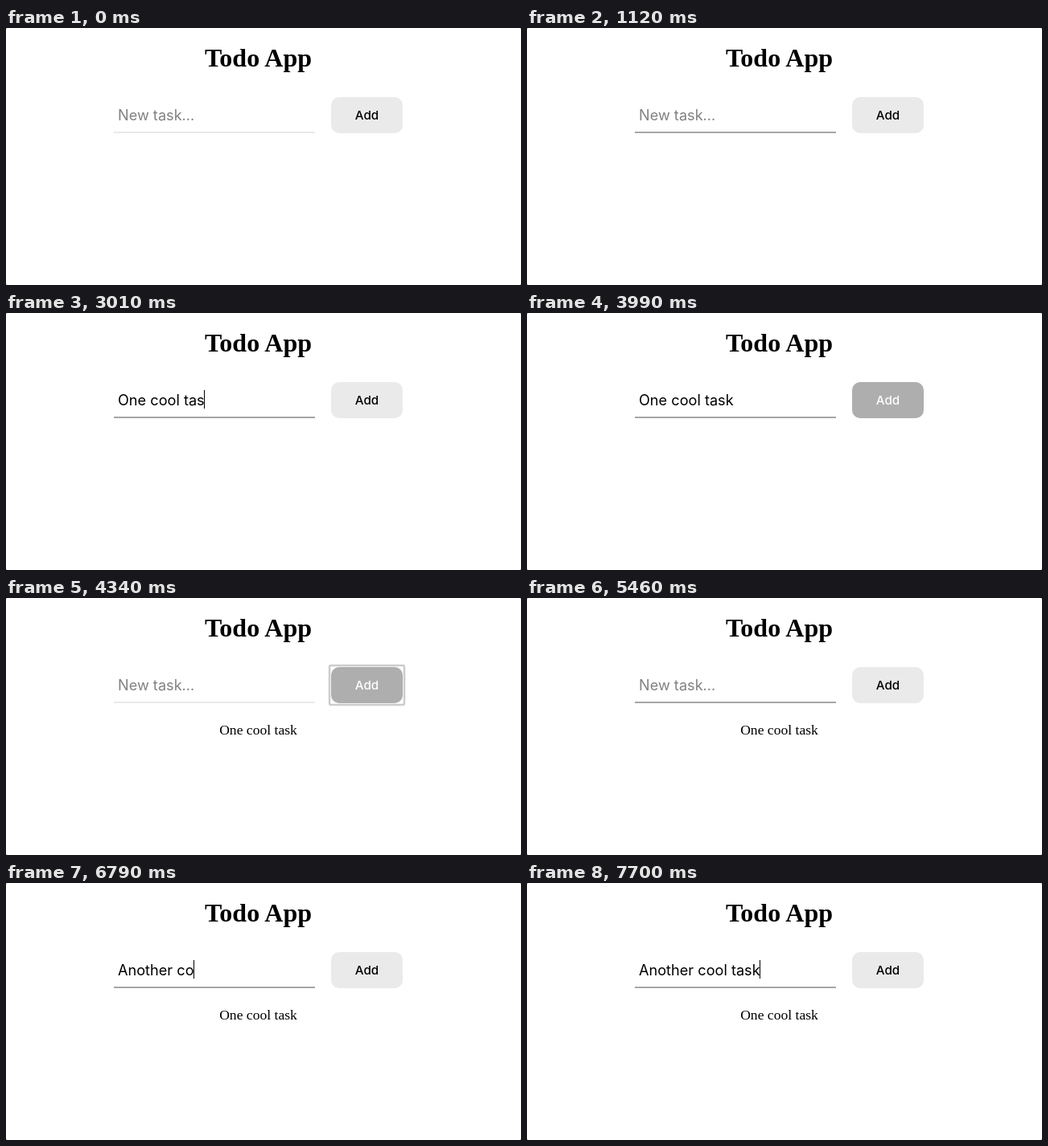
An HTML page that plays this animation: 640 by 320 pixels, repeating every 8000 ms.

```html
<!DOCTYPE html>
<html lang="en">
<head>
<meta charset="utf-8">
<title>Todo App</title>
<style>
  html, body { margin: 0; width: 100%; height: 100%; overflow: hidden; background: #fff; }
  svg { display: block; width: 100vw; height: 100vh; }
  text { white-space: pre; }
  .serif { font-family: "Liberation Serif", "Times New Roman", serif; text-anchor: middle; }
  .sans { font-family: Inter, "Liberation Sans", sans-serif; font-optical-sizing: none; }
</style>
</head>
<body>
<svg viewBox="0 0 640 320">
  <rect width="640" height="320" fill="#8c8c8c"/>
  <rect width="640" height="320" rx="2" fill="#fff"/>
  <text class="serif" x="313.5" y="48" font-size="32" font-weight="700">Todo App</text>

  <rect id="line" x="134" y="129" width="250" height="2"/>
  <text id="field" class="sans" x="139" y="115" font-size="18.15"></text>
  <rect id="caret" y="96" width="1" height="23"/>

  <rect id="ring" x="402" y="84" width="93" height="49" rx="2" fill="none" stroke="#ccc" stroke-width="2.5"/>
  <rect id="button" x="404" y="86" width="89" height="45" rx="10"/>
  <text id="label" class="sans" x="448.5" y="114" font-size="15.2" font-weight="500" text-anchor="middle">Add</text>

  <text id="task" class="serif" x="313.5" y="170" font-size="17.6">One cool task</text>
</svg>
<script>
const LOOP = 8000;
const FIELD_X = 139;
const $ = id => document.getElementById(id);
const [line, field, caret, ring, button, label, task] =
  ["line", "field", "caret", "ring", "button", "label", "task"].map($);

// Each entry is the moment one more character appears.
const first = {
  text: "One cool task",
  keys: [1260, 1540, 1750, 1960, 2100, 2240, 2380, 2520, 2590, 2730, 2870, 3010, 3150]
};
const second = {
  text: "Another cool task",
  keys: [5530, 5880, 6020, 6090, 6230, 6300, 6440, 6580, 6650, 6790,
         7000, 7140, 7280, 7420, 7560, 7560, 7700]
};

const within = (t, from, to) => t >= from && t < to;
const typed = ({ text, keys }, t) => text.slice(0, keys.filter(k => k <= t).length);
const show = (el, on) => el.setAttribute("visibility", on ? "visible" : "hidden");
const fill = (el, color) => el.setAttribute("fill", color);

function render(t) {
  const added = t >= 4270;
  const focused = within(t, 630, 4130) || t >= 4900;
  const hover = within(t, 3990, 4690);
  const blinkOff = within(t, 1050, 1260) || within(t, 3710, 4130) || within(t, 5460, 5530);
  const value = typed(added ? second : first, t);

  field.textContent = value || "New task...";
  fill(field, value ? "#000" : "#828282");
  fill(line, focused ? "#a6a6a6" : "#eaeaea");

  const width = value ? field.getComputedTextLength() : 0;
  caret.setAttribute("x", Math.floor(FIELD_X + width));
  show(caret, focused && !blinkOff);

  show(ring, within(t, 4130, 4900));
  fill(button, hover ? "#aeaeae" : "#eaeaea");
  fill(label, hover ? "#fff" : "#000");
  show(task, added);
}

const start = performance.now();
function tick() {
  render((performance.now() - start) % LOOP);
  requestAnimationFrame(tick);
}
tick();
</script>
</body>
</html>
```
